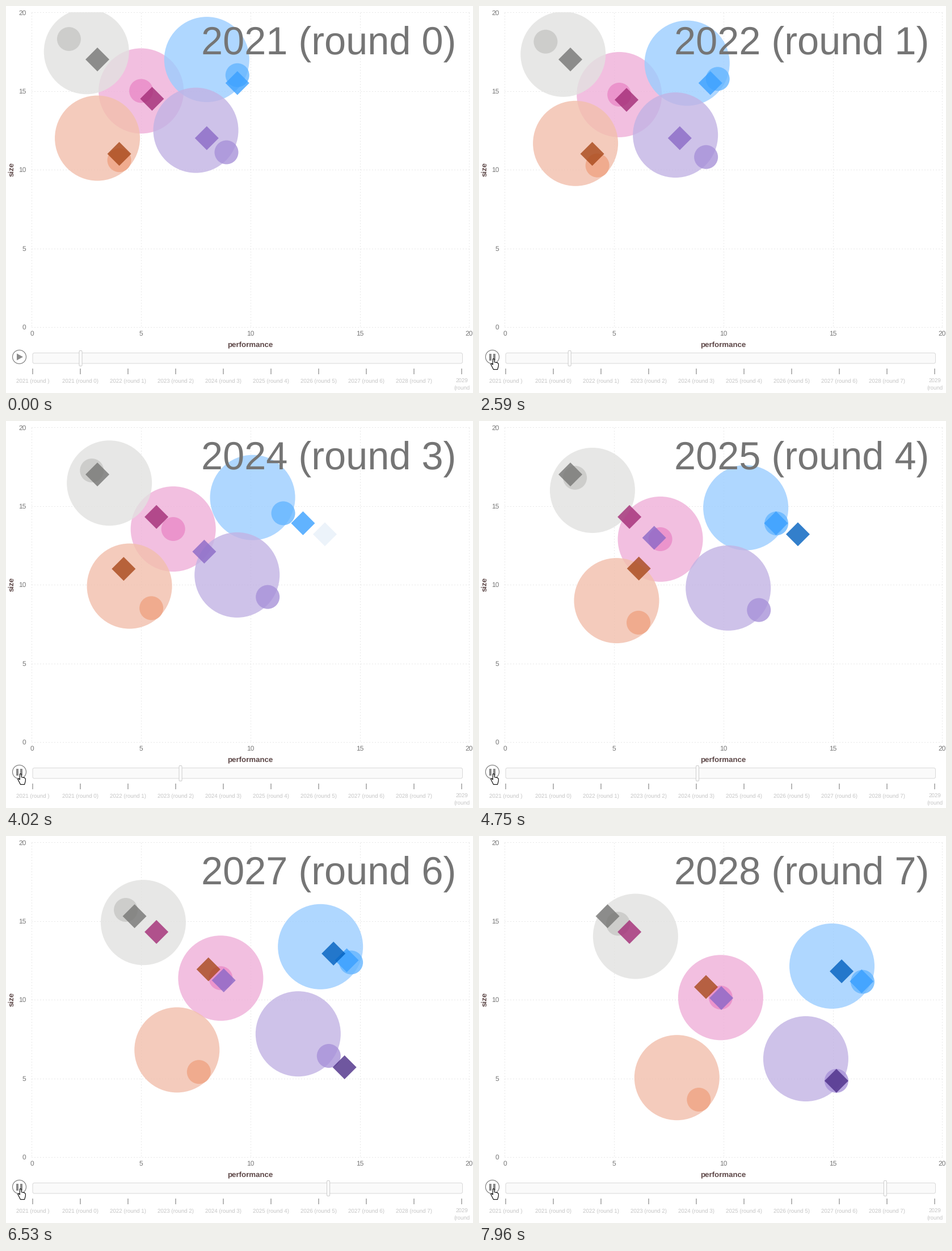
Recreate the animation shown at these times as a matplotlib script. Size 823 by 681 pixels, loop 8000 ms.

```python
import numpy as np
import matplotlib.pyplot as plt
from matplotlib.animation import FuncAnimation
from matplotlib.patches import Circle, FancyBboxPatch, Polygon, Rectangle, RegularPolygon

W, H, DPI = 823, 681, 64
PX = 72 / DPI                 # points per pixel
LOOP, STEP = 8000, 25
PLAY, TICK, PER_ROUND = 2290, 68.2, 11.93
SLIDE0, SLIDE_GAP = 131.5, 84

plt.rcParams["font.family"] = "Liberation Sans"
plt.rcParams["text.hinting"] = "none"

fig = plt.figure(figsize=(W / DPI, H / DPI), dpi=DPI, facecolor="white")
ax = fig.add_axes([0, 0, 1, 1])
ax.set_xlim(0, W)
ax.set_ylim(H, 0)
ax.axis("off")
plot_area = Rectangle((45, 10.5), 772, 555, transform=ax.transData)


def screen(point):
    return 45.4 + point[0] * 38.55, 564.8 - point[1] * 27.69


def label(x, y, s, size, color, **kw):
    kw = {"ha": "center", "va": "baseline", **kw}
    return ax.text(x, y, s, fontsize=size * PX, color=color, **kw)


def add(patch, z):
    patch.set_zorder(z)
    return ax.add_patch(patch)


def rounded(x, y, w, h, r, face, edge, z):
    box = FancyBboxPatch((x, y), w, h, boxstyle=f"round,pad=0,rounding_size={r}",
                         fc=face, ec=edge, lw=PX)
    return add(box, z)


# Axes
for v in range(0, 21, 5):
    x, y = 45.5 + v * 38.55, 565.2 - v * 27.69
    dots = dict(color="#d2d2d2", lw=PX, ls=(0, (1, 4)), zorder=0)
    ax.plot([45.5, 816.5], [y, y], **dots)
    ax.plot([x, x], [11.5, 565], **dots)
    label(35.5, y + 4, str(v), 12, "#777777", ha="right")
    label(x, 580, str(v), 12, "#777777")
label(430.5, 600.5, "performance", 13.3, "#5c4646", weight="bold")
label(10.5, 287.5, "size", 13.3, "#5c4646", va="center", weight="bold", rotation=90)


class Segment:
    """A market segment drifting in a straight line, with an ideal spot beside it."""

    def __init__(self, start, drift, offset, light, strong):
        self.start, self.drift, self.offset = map(np.array, (start, drift, offset))
        self.big, self.small = self.disc(75, light, 2), self.disc(21, strong, 3)

    @staticmethod
    def disc(radius, color, z):
        c = add(Circle((0, 0), radius, fc=color, ec="none", alpha=.8), z)
        c.set_clip_path(plot_area)
        return c

    def ideal(self, r):
        return self.start + self.drift * r + self.offset

    def update(self, p):
        self.small.center = screen(self.ideal(p))
        self.big.center = screen(self.ideal(p) - self.offset)


pink = Segment((5, 15), (.7, -.7), (0, 0), "#efb0d9", "#ea8ac7")
blue = Segment((8, 17), (1, -.7), (1.4, -1), "#9bcdff", "#65b6ff")
grey = Segment((2.5, 17.5), (.5, -.5), (-.8, .8), "#e2e2e0", "#c7c7c5")
orange = Segment((3, 12), (.7, -1), (1, -1.4), "#f2bfac", "#efa483")
purple = Segment((7.5, 12.5), (.9, -.9), (1.4, -1.4), "#c2b3e4", "#a892d9")
segments = pink, blue, grey, orange, purple


class Product:
    """A diamond that moves during some rounds; {round reached: place}."""

    def __init__(self, color, start, moves, born=-1):
        self.born = born
        places = [np.array(start)]
        for r in range(1, 8):
            places.append(np.array(moves.get(r, places[-1])))
        self.xs, self.ys = zip(*places)
        self.mark = add(RegularPolygon((0, 0), 4, radius=21, fc=color, ec="none"), 4)

    def update(self, p):
        rounds = range(8)
        self.mark.xy = screen((np.interp(p, rounds, self.xs), np.interp(p, rounds, self.ys)))
        self.mark.set_alpha(.8 * np.clip(p - self.born, 0, 1))


products = [
    Product("#767674", (3, 17), {5: grey.ideal(6)}),
    Product("#a32c76", (5.5, 14.5), {1: pink.ideal(1)}),
    Product("#8b69c7", (8, 12), {3: (6.8, 13), 4: pink.ideal(5), 6: pink.ideal(7)}),
    Product("#a8481a", (4, 11), {3: (6.1, 11), 4: pink.ideal(4), 6: pink.ideal(6)}),
    Product("#3aa0ff", (9.4, 15.5), {2: blue.ideal(3), 5: blue.ideal(5), 7: blue.ideal(7)}),
    Product("#005fbe", blue.ideal(4), {6: blue.ideal(6)}, born=2),
    Product("#4b2d87", purple.ideal(6), {7: purple.ideal(7)}, born=4),
]

title = label(343.7, 84.8, "", 68.5, "#757575", ha="left", zorder=6)

# Timeline slider
rounded(47, 610.5, 757.5, 18.5, 3, "#fafafa", "#d9d9d9", 5)
handle = rounded(0, 606.5, 5, 27, 1.5, "white", "#cccccc", 6)
names = ["2021 (round )"] + [f"{2021 + r} (round {r})" for r in range(8)] + ["2029"]
for k, name in enumerate(names):
    x = 47.3 + SLIDE_GAP * k
    ax.plot([x, x], [637.5, 647.5], color="#aaaaaa", lw=1.7 * PX, solid_capstyle="butt")
    label(x, 662.5, name, 9.8, "#c6c6c6")
label(803.3, 675.3, "(round", 9.8, "#c6c6c6")

# Play / pause button
add(Circle((23.5, 617.5), 12, fc="white", ec="#808080", lw=1.2 * PX), 5)
play = add(Polygon([(19, 611.5), (19, 623.5), (30, 617.5)], fc="#8a8a8a", ec="none"), 6)
bars = [add(Rectangle((x, 611.5), 4, 12, fc="#8a8a8a", ec="none"), 6) for x in (18, 25.5)]

# Pointers, relative to their tips
ARROW = np.array([(0, 0), (0, 16), (3.7, 12.6), (6.2, 18.3), (8.5, 17.3), (6, 11.8),
                  (11, 11.8)])
HAND = np.array([(-1, .5), (1.3, .2), (2.2, 6.2), (7, 7), (9, 9), (9, 13), (7.3, 19),
                 (.2, 19), (-4.6, 9.6), (-3.2, 8.4), (-1, 10.6)])
pointer = add(Polygon(ARROW, fc="white", ec="black", lw=1.1 * PX, joinstyle="round"), 8)


def move_pointer(t):
    u = np.clip((np.floor((t - 440) / 67) + .3) / 10, 0, 1)
    tip = np.array([25.3, 620.6]) + np.array([294, 54]) * (1 - u) ** 1.6
    pointer.set_visible(t >= 440)
    pointer.set_xy(tip + (HAND if tip[0] < 36 else ARROW))


def draw(i):
    t = i * STEP + 20
    k = np.floor((t - PLAY) / TICK)
    p = max(0, k / PER_ROUND)
    r = int(p) + 1 if k >= 0 else 0
    title.set_text(f"{2021 + r} (round {r})")
    handle.set_x(SLIDE0 + SLIDE_GAP * p - 2.5)
    for item in (*segments, *products):
        item.update(p)

    playing = t >= 1380
    play.set_visible(not playing)
    for b in bars:
        b.set_visible(playing)
    move_pointer(t)
    return []


anim = FuncAnimation(fig, draw, frames=LOOP // STEP, interval=STEP, repeat=True)
plt.show()
```
